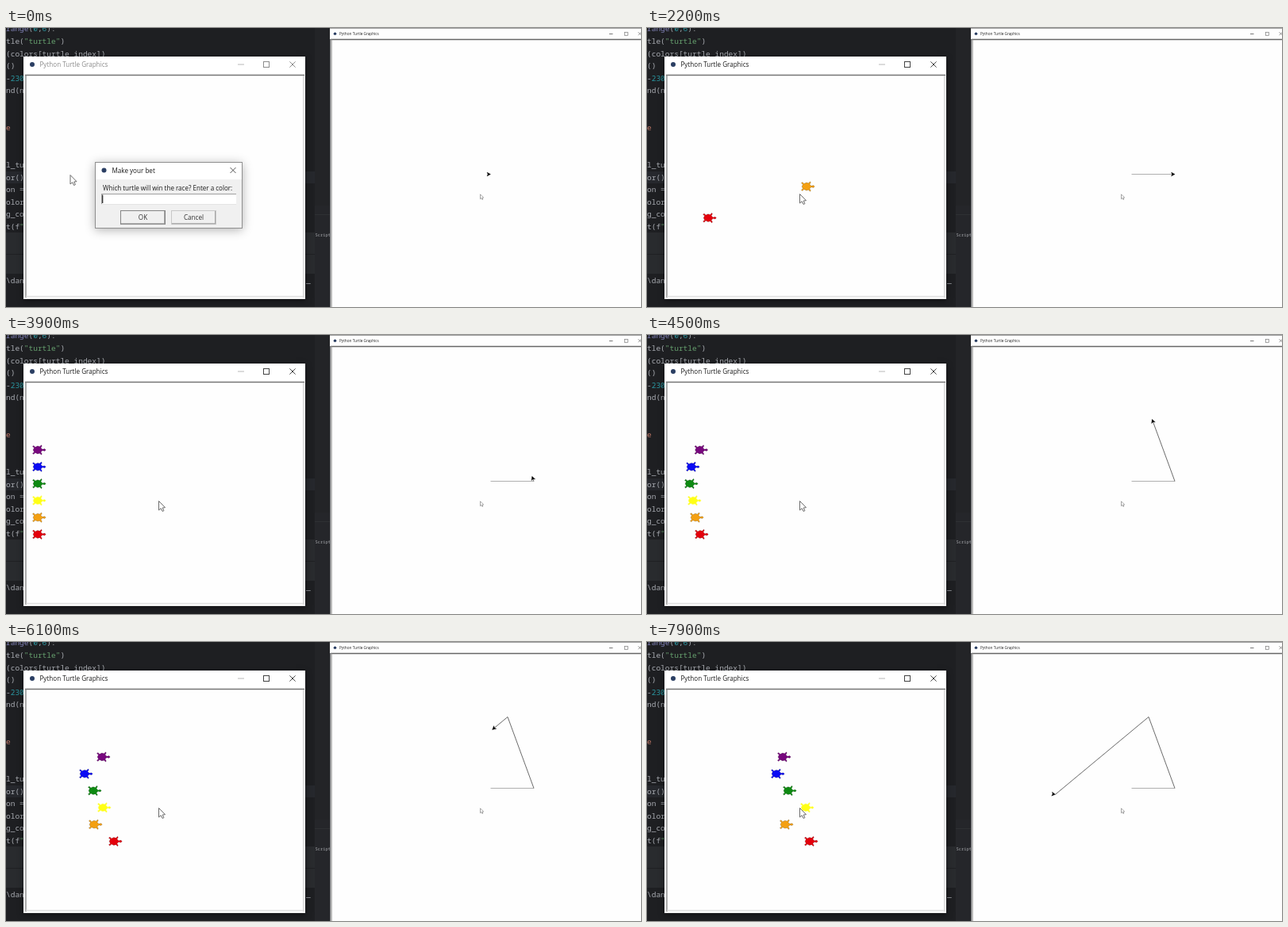
Animation, 800 px wide and 352 px high, one loop 8 s. Source, as an HTML page with a canvas:

```html
<!DOCTYPE html>
<html lang="en">
<head>
<meta charset="utf-8">
<title>Turtle race</title>
<style>
html, body { margin: 0; width: 100%; height: 100%; overflow: hidden; background: #1e1f22; }
canvas { display: block; width: 800px; height: 352px; }
</style>
</head>
<body>
<canvas id="stage" width="800" height="352"></canvas>
<script>
const ctx = document.getElementById('stage').getContext('2d');
const LOOP = 8000, STEP = 100;
const CLOSE = 1800;                   // the dialog goes away
const FLY = 1950, FLY_LEN = 325;      // turtles go to their lanes one by one
const RACE = FLY + 6 * FLY_LEN;
const UI = '"Open Sans", "Noto Sans", sans-serif';
const MONO = '"Noto Sans Mono", "DejaVu Sans Mono", monospace';

const racers = [
  { color: '#e4000c', xs: [39, 66, 135, 170, 204] },
  { color: '#f4a012', xs: [39, 60, 110, 157, 173] },
  { color: '#ffff14', xs: [39, 57, 121, 160, 199] },
  { color: '#0e8a12', xs: [39, 53, 109, 144, 177] },
  { color: '#0a0af4', xs: [39, 55, 98, 130, 162] },
  { color: '#78087e', xs: [39, 65.5, 120, 134, 170] }
];
const raceTimes = [RACE, 4500, 6100, 7100, 7900];

// Half of the turtle outline, nose to tail: [forward, sideways]
const half = [[16, 0], [14, 2], [10, 1], [7, 4], [9, 7], [8, 9], [5, 6], [1, 7],
  [-3, 5], [-6, 8], [-8, 6], [-5, 4], [-7, 0]];
const turtleShape = half.concat(half.slice(1, -1).reverse().map(([x, y]) => [x, -y]));
const arrowShape = [[0, 0], [-9, 5], [-7, 0], [-9, -5]];
const pointer = [[0, 0], [0, 11.5], [2.7, 9.2], [4.6, 13], [6.4, 12.1], [4.7, 8.5], [8, 8.2]];

// Pen corners and timed values of the walk on the right
const corners = [[610.5, 184.5], [665, 184.5], [632, 94.5], [514.5, 192.3]];
const legs = [
  { times: [0, 1400, 1800], part: [0, 0.55, 1] },
  { times: [3850, 4600], part: [0, 1] },
  { times: [5900, 7120], part: [0, 1] }
];
const turnTimes = [2630, 3850, 4600, 5900, 7150, 7900];
const turnAngles = [0, 110, 110, 220, 220, 352];

function tween(t, times, vals) {
  if (t <= times[0]) return vals[0];
  for (let i = 1; i < times.length; i++) {
    if (t <= times[i]) {
      const k = (t - times[i - 1]) / (times[i] - times[i - 1]);
      return vals[i - 1] + (vals[i] - vals[i - 1]) * k;
    }
  }
  return vals[vals.length - 1];
}

function rect(x, y, w, h, color) {
  ctx.fillStyle = color;
  ctx.fillRect(x, y, w, h);
}

function line(x1, y1, x2, y2, color, width = 1) {
  ctx.strokeStyle = color;
  ctx.lineWidth = width;
  ctx.beginPath();
  ctx.moveTo(x1, y1);
  ctx.lineTo(x2, y2);
  ctx.stroke();
}

function frame(x, y, w, h, color) {
  ctx.strokeStyle = color;
  ctx.lineWidth = 1;
  ctx.strokeRect(x + 0.5, y + 0.5, w - 1, h - 1);
}

function text(str, x, y, size, color, family = UI, align = 'left') {
  ctx.font = size + 'px ' + family;
  ctx.textAlign = align;
  ctx.textBaseline = 'alphabetic';
  ctx.fillStyle = color;
  ctx.fillText(str, x, y);
  return x + ctx.measureText(str).width;
}

function poly(points, x, y, scale, angle, fill, stroke, width) {
  ctx.save();
  ctx.translate(x, y);
  ctx.rotate(-angle * Math.PI / 180);
  ctx.scale(scale, scale);
  ctx.beginPath();
  points.forEach(([px, py]) => ctx.lineTo(px, py));
  ctx.closePath();
  ctx.fillStyle = fill;
  ctx.fill();
  if (stroke) {
    ctx.strokeStyle = stroke;
    ctx.lineWidth = width / scale;
    ctx.stroke();
  }
  ctx.restore();
}

function dot(x, y, r) {
  ctx.fillStyle = '#2b3f63';
  ctx.beginPath();
  ctx.arc(x, y, r, 0, 7);
  ctx.fill();
}

function cross(x, y, r, color, width) {
  line(x - r, y - r, x + r, y + r, color, width);
  line(x - r, y + r, x + r, y - r, color, width);
}

function shadowBox(x, y, w, h, fill, blur, alpha) {
  ctx.save();
  ctx.shadowColor = `rgba(0,0,0,${alpha})`;
  ctx.shadowBlur = blur;
  ctx.shadowOffsetY = 2;
  rect(x, y, w, h, fill);
  ctx.restore();
}

function code(row, ...parts) {
  let x = 0;
  for (let i = 0; i < parts.length; i += 2) {
    x = text(parts[i], x, 4.3 + row * 15.6, 9.5, parts[i + 1], MONO);
  }
}

function editor() {
  const plain = '#a9acb2', number = '#2a98a2', str = '#659e6d';
  rect(0, 0, 409, 352, '#1e1f22');
  rect(0, 181, 389, 15, '#26282d');
  rect(0, 258, 389, 52, '#292b2e');
  line(0, 285.5, 389, 285.5, '#1f2023');
  rect(389, 0, 20, 224, '#232427');
  rect(389, 224, 20, 128, '#25262a');
  line(389, 235.5, 409, 235.5, '#2e3033');

  code(0, 'range', '#8081b6', '(', plain, '0', number, ',', plain, '6', number, '):', plain);
  code(1, 'tle(', plain, '"turtle"', str, ')', plain);
  code(2, '(colors[turtle_index])', plain);
  code(3, '()', plain);
  code(4, '-', plain, '230', number);
  code(5, 'nd(n', plain);
  code(8, 'e', '#bd7766');
  code(11, 'l_tu', plain);
  code(12, 'or()', plain);
  code(13, 'on =', plain);
  code(14, 'olor', plain);
  code(15, 'g_co', plain);
  code(16, 't(f', plain, '"', str);
  text('\\dani', 0, 322, 9.5, plain, MONO);
  text('_', 378, 321, 9.5, plain, MONO);
  text('Script', 389.5, 263, 5.4, '#a6a8ac', MONO);
}

function raceWindow(active) {
  shadowBox(22, 36, 355, 306, '#f6f6f6', 8, 0.45);
  rect(22, 36, 355, 22, '#fff');
  rect(25, 60, 350, 279, '#fefefe');
  line(24, 59.5, 376, 59.5, '#777', 1.3);
  line(25, 59, 25, 340, '#858585', 1.3);
  line(374.5, 60, 374.5, 340, '#d4d4d4');
  line(25, 338.5, 376, 338.5, '#dcdcdc');
  dot(33, 46, 3);
  text('Python Turtle Graphics', 42.5, 49, 8.1, active ? '#1c1c1c' : '#8c8c8c');
  const tone = active ? '#444' : '#8c8c8c';
  line(292, 46, 300, 46, '#b8b8b8');
  frame(324, 42, 8, 8, tone);
  cross(361, 46, 3.6, tone, 1);
}

function walkWindow() {
  rect(408, 0, 392, 352, '#fefefe');
  line(408, 0.5, 800, 0.5, '#a0a0a0');
  line(408.5, 14, 408.5, 352, '#75777a');
  line(409, 14.5, 800, 14.5, '#666', 1.3);
  line(410, 14, 410, 352, '#8c8c8c', 1.2);
  dot(414.5, 7.3, 1.8);
  text('Python Turtle Graphics', 420, 9, 4.7, '#222');
  line(760, 7.5, 764.5, 7.5, '#555', 0.8);
  ctx.lineWidth = 0.7;
  ctx.strokeStyle = '#777';
  ctx.strokeRect(779.3, 5.3, 4, 4);
  cross(798.5, 7.2, 2, '#666', 0.7);
}

function button(x, label, main) {
  rect(x, 230, 57, 18, '#f0f0f0');
  frame(x, 230, 57, 18, main ? '#858585' : '#c8c8c8');
  line(x + 1, 246.8, x + 56, 246.8, '#9a9a9a');
  line(x + 55.5, 231, x + 55.5, 247, '#a5a5a5');
  text(label, x + 28.5, 242, 8.1, '#333', UI, 'center');
}

function dialog(t) {
  shadowBox(112, 169, 186, 84, '#f0f0f0', 12, 0.3);
  rect(112, 169, 186, 22, '#fff');
  frame(112, 169, 186, 84, '#8f8f8f');
  dot(123.5, 179.5, 3);
  text('Make your bet', 133.5, 182.7, 8.1, '#1a1a1a');
  cross(286, 179.5, 3.5, '#555', 1);
  text('Which turtle will win the race? Enter a color:', 122, 205, 8.05, '#1a1a1a');
  rect(120, 209, 170, 13, '#fff');
  line(120, 209.5, 290, 209.5, '#a0a0a0');
  line(120.5, 209, 120.5, 222, '#a0a0a0');
  line(120, 222.5, 290, 222.5, '#e4e4e4');
  const typed = 'red'.slice(0, [1100, 1300, 1500].filter(k => t >= k).length);
  const end = text(typed, 122, 218.8, 8.1, '#333');
  if (t % 1000 < 400) line(end - 0.3, 210.5, end - 0.3, 221, '#222', 1.2);
  button(144, 'OK', true);
  button(208, 'Cancel', false);
}

function turtles(t) {
  racers.forEach((r, i) => {
    const start = FLY + i * FLY_LEN;
    if (t < start - STEP) return;
    const lane = 251.5 - i * 21.3;
    const flight = [start, start + FLY_LEN];
    const x = t < RACE ? tween(t, flight, [200, 39]) : tween(t, raceTimes, r.xs);
    const y = tween(t, flight, [200, lane]);
    poly(turtleShape, x, y, 0.7, 0, r.color, i === 2 ? '#ffff7a' : 'rgba(0,0,0,.3)', 0.6);
  });
}

function walker(t) {
  let tip = corners[0];
  legs.forEach((leg, i) => {
    if (t < leg.times[0]) return;
    const [ax, ay] = corners[i], [bx, by] = corners[i + 1];
    const k = tween(t, leg.times, leg.part);
    tip = [ax + (bx - ax) * k, ay + (by - ay) * k];
    line(ax, ay, tip[0], tip[1], i ? '#444' : '#b0b0b0', i ? 0.8 : 1);
  });
  poly(arrowShape, tip[0], tip[1], 0.5, tween(t, turnTimes, turnAngles), '#000', '#000', 0.3);
}

function mouse(t) {
  const x = tween(t, [100, 900], [81, 192.5]);
  const y = tween(t, [100, 900], [185.5, 209.5]);
  if (t < CLOSE && y >= 209) {
    line(x + 1, 204.5, x + 1, 215, '#666');
    line(x - 1.5, 215, x + 3.5, 215, '#555');
  } else {
    poly(pointer, x, y, 1, 0, '#fff', '#6a6a6a', 1);
  }
}

function draw(t) {
  editor();
  raceWindow(t >= CLOSE);
  if (t < CLOSE) dialog(t);
  turtles(t);
  mouse(t);
  walkWindow();
  walker(t);
  poly(pointer, 597.5, 209.8, 0.52, 0, '#fff', '#808080', 0.7);
}

function tick() {
  const t = performance.now() % LOOP;
  draw(Math.floor(t / STEP) * STEP);
  requestAnimationFrame(tick);
}
tick();
</script>
</body>
</html>
```
